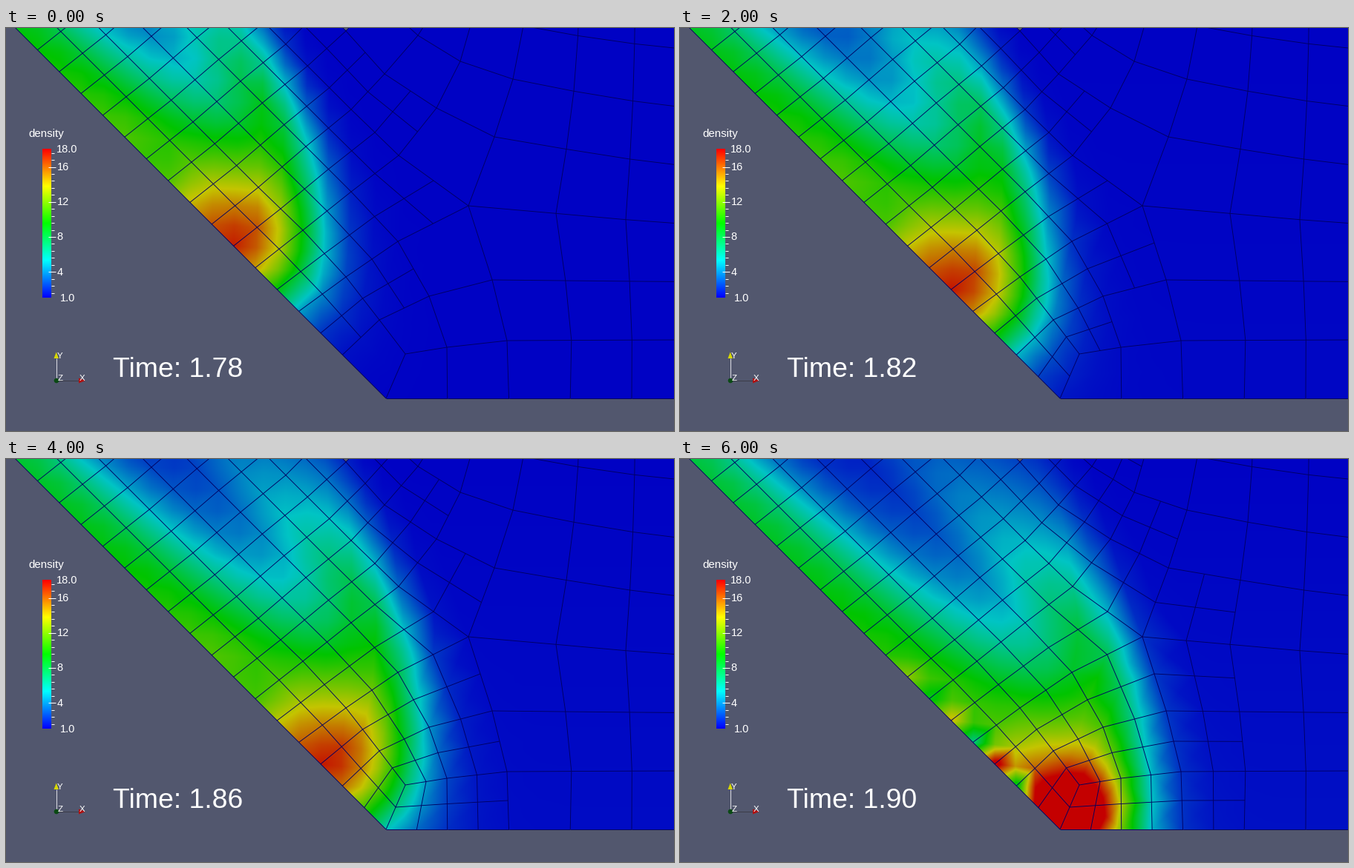
Write a matplotlib script that moves like this. It is 900 by 544 pixels and loops after 7000 ms.

```python
import numpy as np
import matplotlib.pyplot as plt
from matplotlib.animation import FuncAnimation
from matplotlib.collections import LineCollection
from matplotlib.tri import Triangulation

W, H, DPI = 900, 544, 100
PX = 72 / DPI
FRAMES = 7
BACK = np.array([82, 87, 110]) / 255
SHADE = 0.77


def run(start, n):
    """Points going up-left, parallel to the wall."""
    return [(start[0] - 58.7 * i, start[1] - 58.8 * i) for i in range(n)]


def spread(start, r):
    """Row r of the right part, fanning out from its left node."""
    x0, y0 = start
    rise = 421 - 78.6 * r - y0
    return [(623 + 130 * c - 12 * c * c + (x0 - 623) * 0.4 ** c,
             y0 + rise * (1 - (1 - c / 3) ** 1.4)) for c in range(4)]


# Coarse mesh: lines along the wall and rows to the right
spine = [(675, 422), (655, 340), (623, 240), (658, 147), (683, 69),
         (697, -3), (703, -75)]
right = [spread(p, r) for r, p in enumerate(spine)]
floor = [(512 + 82.75 * i, 500) for i in range(6)]
above = [(538, 440), (594, 431)] + right[0]
wall = run((512, 500), 10)
line1 = [(538, 440), (503, 394), (458, 336), (400, 273)] + run((340, 215), 6)
line2 = [(594, 431), (570, 362), (528, 288), (465, 221)] + run((404, 160), 5)
line3 = spine[:3] + [(529, 172)] + run((465, 110), 4)
line4 = [(580, 108), (510, 62), (458, 4), (395, -60)]
line5 = [(612, 45), (555, 10), (500, -40)]
line6 = [(632, -25), (590, -45), (545, -85)]
upper = [line3[3:7], line4, line5, line6]
link = [[a[0], b[0]] for a, b in zip(upper, right[2:])]
BLOCKS = [[wall, line1, line2, line3], upper, [floor, above], right, link]


def mid(*pts):
    n = len(pts)
    return sum(p[0] for p in pts) / n, sum(p[1] for p in pts) / n


def wall_coords(x, y):
    """Distance along the wall and away from it."""
    return (x + y) / 2, (x - y - 12) / 2


def split_step(center):
    """First step at which the nearing front splits a cell."""
    a, b = wall_coords(*center)
    ahead = a - 0.5 * b + 0.0055 * b * b
    return next((k for k in range(FRAMES)
                 if ahead <= 448 + 16 * k + 3.5 * k * k), FRAMES)


def cells():
    for rows in BLOCKS:
        for low, high in zip(rows, rows[1:]):
            for i in range(min(len(low), len(high)) - 1):
                yield low[i], low[i + 1], high[i + 1], high[i]


index, triangles = {}, []
edges, crosses = set(), []


def node(p):
    return index.setdefault((float(p[0]), float(p[1])), len(index))


for quad in cells():
    center = mid(*quad)
    step = split_step(center)
    mids = [mid(quad[i], quad[(i + 1) % 4]) for i in range(4)]
    for i in range(4):
        edges.add(tuple(sorted((quad[i], quad[(i + 1) % 4]))))
        crosses.append((step, (mids[i], center)))
        sub = (quad[i], mids[i], center, mids[i - 1])
        hub = node(mid(*sub))
        for k in range(4):
            triangles.append((node(sub[k]), node(sub[(k + 1) % 4]), hub))

nodes = np.array(list(index))
mesh = Triangulation(nodes[:, 0], nodes[:, 1], triangles)
gx, gy = np.meshgrid(np.arange(W) + 0.5, np.arange(H) + 0.5)
owner = mesh.get_trifinder()(gx, gy)
inside = (owner >= 0) & (gy < 500)


def density(step):
    x, y = nodes.T
    a, b = wall_coords(x, y)
    t = a - 298 - 31 * step
    b = np.maximum(b, 0) / (1 + 0.03 * step)

    def spot(cx, cy, radius):
        return np.exp(-((x - cx) ** 2 + (y - cy) ** 2) / radius ** 2)

    # Shocked gas behind a curved front, and a dense layer on the wall
    d = t - (58 + 0.22 * b - 0.0072 * b * b)
    front = 0.5 * (1 - np.tanh(d / 45))
    reach = 105 + 75 / (1 + np.exp((115 - b) / 8))
    gas = 16 * np.exp(np.minimum(d, -58) / reach - (b / 160) ** 4)
    layer = (8.5 + 0.003 * t) * np.exp(-(b / np.maximum(75 + 0.07 * t, 35)) ** 2)
    dip = 2.3 * np.exp(-((t + 95) / 35) ** 2 - (b / 30) ** 2)
    rho = 1.05 + 1e-4 * step * y + front * (gas + layer - dip)

    # Reflection at the corner, with a growing ripple along the wall
    late = max(step - 4, 0)
    if late:
        rho += 7.5 * spot(485 + 30 * late, 505 - 10 * late, 38 + 12 * late)
        for i in range(6):
            height = -2 * late ** 2 * (-1) ** i * np.exp(-0.3 * i)
            rho += height * spot(453.3 - 29.35 * i, 441.2 - 29.4 * i, 12)
    return np.maximum(rho, 1)


def rainbow(rho):
    v = 4 * np.clip((rho - 1) / 17, 0, 1)
    rgb = [v - 2, np.minimum(v, 4 - v), 2 - v]
    return np.clip(np.stack(rgb, axis=-1), 0, 1)


def picture(step):
    plane = mesh.calculate_plane_coefficients(density(step))[owner]
    rho = plane[..., 0] * gx + plane[..., 1] * gy + plane[..., 2]
    return np.where(inside[..., None], SHADE * rainbow(rho), BACK)


def segments(step):
    return list(edges) + [seg for start, seg in crosses if start <= step]


fig = plt.figure(figsize=(W / DPI, H / DPI), dpi=DPI, facecolor=BACK)
ax = fig.add_axes([0, 0, 1, 1])
ax.axis("off")

surface = ax.imshow(picture(0), extent=(0, W, H, 0), interpolation="nearest",
                    aspect="auto")
grid = LineCollection(segments(0), colors=[(0, 0, 0.38)], linewidths=0.9 * PX,
                      zorder=2)
ax.add_collection(grid)


def label(x, y, text, size):
    return ax.text(x, y, text, color="white", fontsize=size * PX,
                   family="Liberation Sans", ha="left", va="baseline", zorder=6)


def stroke(xs, ys, color="white"):
    ax.plot(xs, ys, color=color, lw=PX, solid_capstyle="butt", zorder=4)


# Colour legend
bar = rainbow(np.linspace(18, 1, 201))[:, None]
ax.imshow(bar, extent=(49, 61, 364, 163), interpolation="nearest",
          aspect="auto", zorder=3)
label(30, 147, "density", 15)
label(68, 168, "18.0", 14.5)
label(73, 369, "1.0", 14.5)
for i in range(-2, 19):
    y = 187.5 + 9.45 * i
    major = i % 5 == 0
    stroke((57, 67) if major else (61, 65), (y, y))
    if major:
        label(68.5, y + 4.5, str(16 - 4 * i // 5), 14.5)

# Orientation axes
stroke((67.5, 67.5), (475, 446), "#dcdce4")
stroke((70, 98), (475.5, 475.5), "#3c3c48")
ax.fill([64.5, 71, 67.7], [446, 446, 437.5], color="#d8d800", lw=0, zorder=4)
ax.fill([98, 98, 107], [472.5, 479.5, 476], color="#b01010", lw=0, zorder=4)
ax.add_patch(plt.Circle((68, 476), 3.3, color="#0a4a14", lw=0, zorder=4))
for x, y, name in ((69, 446, "Y"), (70, 476, "Z"), (99, 476, "X")):
    label(x, y, name, 11.5)

clock = label(143.5, 471, "", 37.4)
ax.set_xlim(0, W)
ax.set_ylim(H, 0)

pictures = [picture(k) for k in range(FRAMES)]


def draw(step):
    surface.set_data(pictures[step])
    grid.set_segments(segments(step))
    clock.set_text(f"Time: {1.78 + 0.02 * step:.2f}")
    return surface, grid, clock


anim = FuncAnimation(fig, draw, frames=FRAMES, interval=1000, repeat=True,
                     repeat_delay=0, blit=False)
plt.show()
```
